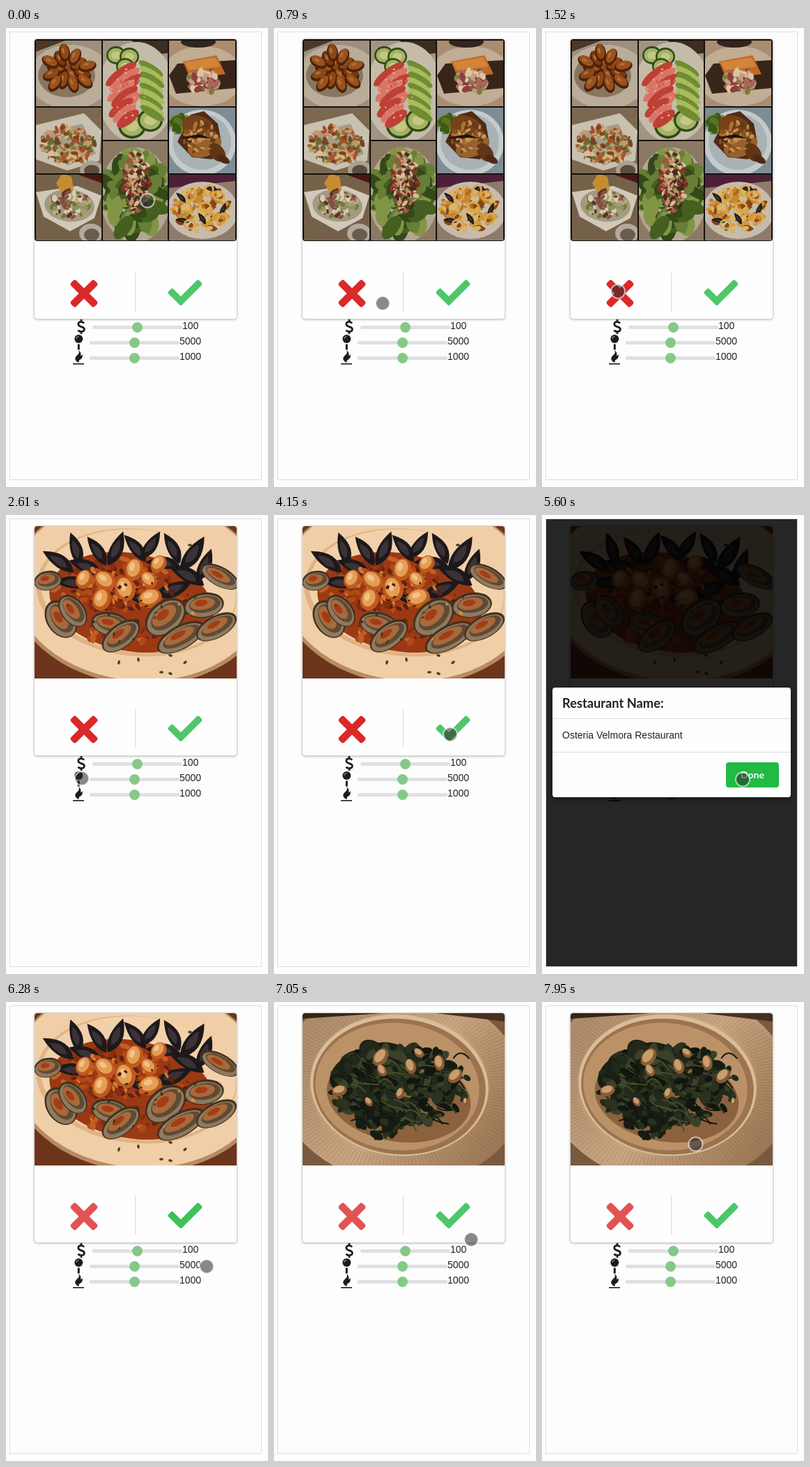
Animation, 376 px wide and 657 px high, one loop 8 s. Source, as an HTML page with a canvas:

```html
<!DOCTYPE html>
<html lang="en">
<head>
<meta charset="utf-8">
<title>Restaurant picker</title>
<style>
html, body { margin: 0; width: 100%; height: 100%; overflow: hidden; background: #fdfdfd; }
canvas { display: block; }
</style>
</head>
<body>
<canvas id="stage" width="376" height="657"></canvas>
<script>
const LOOP = 8000;
const stage = document.getElementById('stage').getContext('2d');
let g = stage, seed = 1;

const rnd = () => (seed = seed * 16807 % 2147483647) / 2147483647;
const pick = list => list[Math.floor(rnd() * list.length)];

function el(color, x, y, rx, ry = rx, angle = 0) {
  g.fillStyle = color;
  g.beginPath();
  g.ellipse(x, y, rx, ry, angle, 0, 7);
  g.fill();
}
function rect(color, x, y, w, h, r = 0) {
  g.fillStyle = color;
  g.beginPath();
  g.roundRect(x, y, w, h, r);
  g.fill();
}
function poly(color, ...p) {
  g.fillStyle = color;
  g.beginPath();
  for (let i = 0; i < p.length; i += 2) g.lineTo(p[i], p[i + 1]);
  g.fill();
}
function text(str, x, y, font, color = '#222', align = 'left') {
  g.font = font;
  g.fillStyle = color;
  g.textAlign = align;
  g.fillText(str, x, y);
}
// Random slivers spread over an ellipse
function scatter(n, x, y, rx, ry, size, colors) {
  while (n--) {
    const a = rnd() * 6.28, d = Math.sqrt(rnd()), s = size * (.5 + rnd() * .6);
    el(pick(colors), x + Math.cos(a) * d * rx, y + Math.sin(a) * d * ry, s, s * (.35 + rnd() * .4), rnd() * 3.1);
  }
}
function mussel(x, y, len, angle) {
  g.save();
  g.translate(x, y);
  g.rotate(angle);
  for (const [color, k] of [['#1d191b', 1], ['#3a3236', .55]]) {
    g.fillStyle = color;
    g.beginPath();
    g.moveTo(-len * k, 0);
    g.quadraticCurveTo(len * .2 * k, -len * .85 * k, len * k, 0);
    g.quadraticCurveTo(len * .2 * k, len * .55 * k, -len * k, 0);
    g.fill();
  }
  g.restore();
}
function clam(x, y, rx, ry, angle) {
  el('#43311f', x, y, rx, ry, angle);
  el('#8d7a5f', x, y + 1, rx * .92, ry * .87, angle);
  el('#5f4a34', x + 1, y - 1, rx * .78, ry * .66, angle);
  el('#a76a3c', x - 2, y - 2, rx * .62, ry * .48, angle);
  el('#a23d17', x - 4, y - 3, rx * .32, ry * .25, angle);
}

function photo(height, paint) {
  const canvas = document.createElement('canvas');
  canvas.width = 290;
  canvas.height = height;
  g = canvas.getContext('2d');
  g.translate(-41, -16);
  seed = 4711;
  paint();
  g = stage;
  return canvas;
}
function tile(x, y, w, h, color, paint) {
  g.save();
  g.beginPath();
  g.rect(x, y, w, h);
  g.clip();
  rect(color, x, y, w, h);
  paint();
  g.restore();
}

const collage = photo(289, () => {
  rect('#15110e', 41, 16, 290, 289);
  tile(43, 18, 94, 94, '#9d8f7c', () => {
    poly('#4d3929', 43, 18, 85, 18, 43, 34);
    el('#b9ac99', 92, 70, 60, 46);
    el('#897661', 87, 68, 41, 31);
    for (let i = 0; i < 17; i++) {
      const a = i * 2.4, d = Math.sqrt(i) * 8.2;
      const x = 88 + Math.cos(a) * d, y = 59 + Math.sin(a) * d * .78;
      el('#4c210b', x, y + 1, 13, 8, a);
      el(pick(['#793810', '#8c4717', '#9a511d']), x, y - 1, 11, 6, a);
      el('#b26d32', x - 2, y - 2, 4, 2, a);
    }
  });
  tile(43, 114, 94, 94, '#7c6751', () => {
    poly('#c9c1b0', 43, 139, 112, 122, 137, 147, 134, 190, 88, 204, 43, 188);
    poly('#a59b88', 53, 150, 110, 137, 129, 180, 88, 197);
    scatter(190, 89, 167, 39, 28, 5, ['#9f6a38', '#c49a68', '#75441f', '#d6b17b', '#617034', '#aa4b2a']);
    el('#a9a292', 123, 203, 17, 13);
    el('#5b4d3e', 123, 204, 11, 8);
  });
  tile(43, 210, 94, 94, '#756149', () => {
    poly('#4a1816', 104, 210, 137, 210, 137, 222);
    poly('#d0c9ba', 43, 235, 102, 226, 137, 240, 127, 272, 92, 291, 54, 270);
    el('#a49a7e', 91, 254, 36, 23, .1);
    poly('#c58c32', 72, 222, 81, 208, 94, 213, 97, 232, 80, 236);
    scatter(90, 92, 252, 28, 19, 5, ['#6e783c', '#c3aa87', '#8c4a45', '#d8ccb5', '#5b3429', '#8e9255']);
    el('#b3aa9b', 122, 294, 17, 14);
    el('#6b5c4d', 123, 296, 11, 9);
  });
  tile(139, 18, 93, 142, '#a29480', () => {
    poly('#3c2d22', 180, 18, 232, 18, 232, 36, 208, 39);
    el('#c4bba9', 187, 92, 56, 72);
    for (const [x, y, r] of [[158, 39, 14], [177, 41, 14], [171, 55, 13], [181, 140, 20], [207, 132, 18]]) {
      el('#304915', x, y, r, r * .92);
      el('#a4b267', x, y, r * .82, r * .73);
      el('#c3c882', x, y, r * .48, r * .4);
    }
    for (let i = 0; i < 9; i++) {
      el(i % 2 ? '#d97568' : '#be4035', 165 + i % 3 * 5, 66 + i * 8, 27 - i, 8, -.65);
      el(i % 2 ? '#aabb5d' : '#6f8c33', 208 + i % 3, 58 + i * 8, 20, 6, .55);
    }
    scatter(45, 174, 94, 25, 35, 2, ['#e69a86', '#c74e40', '#e8b199']);
  });
  tile(139, 162, 93, 142, '#8c7964', () => {
    el('#b4a68f', 186, 239, 51, 68);
    scatter(90, 186, 237, 42, 55, 18, ['#455f21', '#667e36', '#334919', '#829546']);
    scatter(170, 188, 221, 19, 43, 5, ['#8f3425', '#c48e6c', '#653525', '#d8b99a', '#9f5138', '#452b20']);
  });
  tile(234, 18, 95, 94, '#aa8d70', () => {
    el('#c1ad94', 282, 69, 59, 43);
    poly('#372519', 234, 68, 246, 51, 329, 46, 329, 86, 244, 94);
    poly('#bd6a27', 254, 48, 302, 39, 315, 66, 264, 72);
    poly('#d28538', 256, 49, 300, 42, 308, 55, 263, 61);
    scatter(70, 283, 77, 21, 17, 7, ['#c59c81', '#8d3e3c', '#dcc3a7', '#a76759', '#7d7942']);
    el('#33251d', 276, 20, 25, 8);
  });
  tile(234, 114, 95, 94, '#7e8c94', () => {
    el('#c4cacb', 281, 164, 49, 47);
    el('#a8b1b4', 281, 163, 42, 40);
    scatter(24, 250, 137, 12, 13, 9, ['#557522', '#78932d', '#3e5818']);
    poly('#502b14', 246, 163, 265, 124, 284, 119, 304, 137, 309, 164, 296, 188, 267, 185);
    el('#764119', 276, 142, 24, 16, .35);
    el('#98602d', 285, 169, 25, 15, -.35);
    el('#613515', 303, 178, 15, 10, .9);
    scatter(45, 280, 158, 25, 24, 5, ['#ad7339', '#67391a', '#875022', '#c59554']);
    poly('#1c130e', 247, 158, 277, 152, 296, 158, 276, 157);
    el('#4b2a17', 312, 188, 10, 5, .5);
  });
  tile(234, 210, 95, 94, '#8e7b6b', () => {
    poly('#4d2038', 234, 210, 329, 210, 329, 219, 234, 229);
    el('#c6bcae', 282, 261, 51, 41);
    scatter(150, 280, 258, 40, 31, 7, ['#b66a20', '#d29a3a', '#854514', '#c48732', '#d7b570']);
    for (const [x, y, a] of [[251, 243, .8], [253, 276, .2], [281, 273, 1], [311, 259, 2], [295, 231, .2]])
      mussel(x, y, 10, a);
    g.strokeStyle = '#dda548';
    g.lineWidth = 3;
    for (const [x, y] of [[266, 240], [291, 233], [305, 240], [286, 256], [264, 281], [310, 273]]) {
      g.beginPath();
      g.ellipse(x, y, 8, 6, x, 0, 7);
      g.stroke();
    }
  });
});

const seafood = photo(218, () => {
  rect('#6d351c', 41, 16, 290, 218);
  el('#b98a62', 191, 109, 184, 134, .08);
  el('#f0cfa8', 191, 107, 180, 130, .08);
  el('#dfb385', 187, 111, 144, 91, .1);
  el('#f2d1aa', 190, 109, 140, 88, .1);
  el('#9b3914', 180, 125, 119, 70, .18);
  scatter(90, 180, 123, 115, 62, 8, ['#ad4819', '#812d10', '#c35f25', '#682411']);
  for (const [x, y, l, a] of [[75, 67, 27, .6], [99, 49, 25, 1.3], [114, 75, 26, .4], [130, 52, 25, 1],
    [157, 48, 27, 2], [185, 48, 25, .9], [207, 43, 24, 2.2], [225, 70, 25, .1], [238, 48, 25, 1.1],
    [267, 55, 30, 2.2], [259, 87, 29, .5], [284, 72, 26, 2], [94, 98, 25, .1], [240, 105, 29, 2.8], [199, 121, 27, .2]])
    mussel(x, y, l, a);
  scatter(100, 168, 104, 75, 33, 6, ['#5e210f', '#b44b19', '#822e12', '#d87732']);
  for (const [x, y, r] of [[112, 92, 14], [142, 94, 16], [184, 78, 16], [171, 106, 18], [207, 119, 17],
    [137, 121, 16], [219, 70, 13], [205, 93, 13]]) {
    el('#bf5a1f', x, y, r, r * .82, x);
    el('#e59e55', x - 1, y - 2, r * .78, r * .58, x);
    el('#f1c28a', x - 3, y - 4, r * .38, r * .24, x);
  }
  for (const c of [[60, 94, 20, 14, -.2], [307, 88, 30, 14, .5], [79, 149, 29, 21, 1], [96, 137, 26, 17, .9],
    [150, 156, 28, 17, .2], [165, 173, 32, 17, -.65], [229, 146, 33, 23, -.7], [284, 129, 29, 18, -.15],
    [251, 175, 38, 17, -.5], [302, 160, 32, 16, -.5]]) clam(...c);
  scatter(30, 180, 136, 105, 48, 3, ['#343719', '#e08b42', '#571d0d']);
  for (const [x, y] of [[236, 201], [257, 211], [223, 225], [190, 207], [162, 211], [236, 227], [264, 43]])
    el('#49401c', x, y, 3, 1.8, x);
});

const spinach = photo(218, () => {
  const shade = g.createLinearGradient(41, 16, 331, 234);
  shade.addColorStop(0, '#aa8967');
  shade.addColorStop(.5, '#c8a681');
  shade.addColorStop(1, '#96704e');
  rect('#795a40', 41, 16, 290, 218);
  el(shade, 182, 120, 178, 140, .1);
  g.strokeStyle = 'rgba(95,65,40,.22)';
  g.lineWidth = 1;
  g.beginPath();
  for (let i = 0; i < 170; i++) {
    const a = i / 170 * Math.PI * 2, c = Math.cos(a), s = Math.sin(a);
    g.moveTo(180 + c * 130, 119 + s * 103);
    g.lineTo(181 + c * 169, 120 + s * 135);
  }
  g.stroke();
  el('#dabc96', 180, 119, 128, 101, .1);
  el('#9b7350', 180, 121, 124, 97, .1);
  el('#bb9168', 177, 121, 118, 91, .1);
  el('#8b623d', 179, 136, 104, 64, .15);
  poly('#372419', 41, 16, 156, 16, 41, 24);
  poly('#4a3021', 232, 16, 331, 16, 331, 28);
  scatter(55, 177, 116, 80, 47, 26, ['#242819', '#1b2015', '#2c3220']);
  scatter(260, 179, 120, 100, 58, 10, ['#171c13', '#2b3320', '#20291a', '#39412a', '#11160f']);
  scatter(40, 158, 167, 40, 27, 10, ['#171d13', '#292f1e']);
  g.lineWidth = 2;
  for (let i = 0; i < 55; i++) {
    const x = 98 + rnd() * 160, y = 77 + rnd() * 94;
    g.strokeStyle = pick(['#444c2e', '#30391f', '#12170f']);
    g.beginPath();
    g.moveTo(x, y);
    g.quadraticCurveTo(x + 10, y - 18 + rnd() * 30, x + 23, y + rnd() * 15);
    g.stroke();
  }
  for (const [x, y, r] of [[153, 79, 14], [94, 127, 11], [237, 87, 11], [196, 92, 11], [260, 106, 12],
    [155, 98, 9], [181, 131, 8], [136, 143, 7], [208, 73, 8], [275, 143, 5]]) {
    el('#875c35', x, y, r, r * .7, x);
    el('#c99d6d', x - 1, y - 2, r * .75, r * .45, x);
  }
});

const check = new Path2D('M174 439L7.5 273c-10-10-10-26 0-36l36-36c10-10 26-10 36 0L192 313 432 73c10-10 26-10 36 0l36 36c10 10 10 26 0 36L210 439c-10 10-26 10-36 0z');
const dollar = new Path2D('M112 422.7Q110.5 420.7 108 420.7Q103.8 420.7 103.8 424Q103.8 426.5 108 427.6Q112.4 428.7 112.4 431.3Q112.4 434.6 108 434.6Q105 434.6 103.4 432.6M108 417V421M108 434V438');
const flame = new Path2D('M104 461Q106.5 465 102 468.5Q97 473 101 477Q102.5 478.5 105 479Q103.5 476.5 106 475Q111 472 109.5 467Q108.5 469 107 469Q108.5 464 104 461Z');

function choices(dy, crossAlpha, checkAlpha) {
  g.save();
  g.translate(0, dy);
  rect('#d9d9d9', 185, 350, 1, 56);
  g.save();
  g.globalAlpha = crossAlpha;
  g.translate(112, 380);
  g.fillStyle = '#db2828';
  g.beginPath();
  g.rotate(Math.PI / 4);
  g.roundRect(-24, -5.25, 48, 10.5, 3.4);
  g.roundRect(-5.25, -24, 10.5, 48, 3.4);
  g.fill();
  g.restore();
  g.globalAlpha = checkAlpha;
  g.translate(232.5, 354.3);
  g.scale(.0957, .0957);
  g.fillStyle = '#21ba45';
  g.fill(check);
  g.restore();
}

function sliders(dy) {
  g.save();
  g.translate(0, dy);
  [['100', 124], ['5000', 120], ['1000', 120]].forEach(([label, x], i) => {
    const y = 428.5 + i * 22;
    rect('#e0e0e0', x, y - 2.5, 129, 5, 2);
    el('#85c987', x + 64.5, y, 7.5);
    text(label, x + 129, y + 2.5, '14px "Liberation Sans", Arial, sans-serif');
  });
  g.strokeStyle = g.fillStyle = '#1b1c1d';
  g.lineWidth = 2.7;
  g.stroke(dollar);
  g.fill(flame);
  rect('#1b1c1d', 96, 480, 16, 1.6);
  el('#1b1c1d', 104.3, 445, 6);
  rect('#1b1c1d', 102.8, 452.5, 3, 8);
  g.strokeStyle = '#bbb';
  g.lineWidth = 1;
  g.beginPath();
  g.arc(104.3, 445, 3.5, 3.2, 4.7);
  g.stroke();
  g.restore();
}

function modal() {
  rect('rgba(0,0,0,.85)', 6, 6, 360, 640);
  g.save();
  g.shadowColor = 'rgba(0,0,0,.5)';
  g.shadowBlur = 6;
  g.shadowOffsetY = 2;
  rect('#fdfefe', 15, 247, 342, 157, 4);
  g.restore();
  rect('#dcdddd', 15, 291, 342, 1);
  rect('#dcdddd', 15, 339, 342, 1);
  text('Restaurant Name:', 29, 275.5, 'bold 18.3px Lato, sans-serif');
  text('Osteria Velmora Restaurant', 29, 320, '14px "Liberation Sans", Arial, sans-serif');
  rect('#21ba45', 264, 354, 76, 36, 4);
  text('Done', 302, 377, 'bold 14px Lato, sans-serif', '#fff', 'center');
}

// Pointer stops: time, x, y
const stops = [
  [0, 203, 247], [120, 200, 240], [250, 199, 234], [400, 187, 270], [530, 171, 310], [670, 164, 355],
  [790, 156, 394], [940, 135, 391], [1060, 123, 388], [1220, 120, 387], [1370, 113, 384], [1520, 109, 377],
  [3730, 153, 340], [3880, 190, 330], [4010, 225, 321], [4150, 253, 314], [5210, 254, 322], [5360, 257, 333],
  [5480, 272, 356], [5600, 288, 378.5], [7050, 283, 340], [7170, 272, 290], [7290, 261, 248],
  [7430, 257, 233], [7560, 250, 219], [7680, 244, 208], [7950, 220.5, 203.5]
];
function pointer(t) {
  const [, x, y] = stops.findLast(s => s[0] <= t);
  el('rgba(40,40,40,.55)', x, y, 10);
  g.strokeStyle = 'rgba(255,255,255,.6)';
  g.lineWidth = 2;
  g.beginPath();
  g.arc(x, y, 10, 0, 7);
  g.stroke();
}

function draw(t) {
  const first = t < 2610, closed = t >= 6280;
  const image = first ? collage : t < 6400 ? seafood : spinach;
  rect('#fdfdfd', 0, 0, 376, 657);
  g.strokeStyle = '#dedede';
  g.lineWidth = 1;
  g.strokeRect(5.5, 5.5, 361, 641);

  const height = first ? 400 : 328;
  g.save();
  g.shadowColor = '#c4c4c5';
  g.shadowBlur = 3;
  g.shadowOffsetY = 1;
  rect('#d4d4d5', 40, 15, 292, height + 2, 5);
  g.restore();
  rect('#fefefe', 41, 16, 290, height, 4);
  g.save();
  g.beginPath();
  g.roundRect(41, 16, 290, image.height, first ? 4 : [4, 4, 0, 0]);
  g.clip();
  g.drawImage(image, 41, 16);
  g.restore();

  choices(first ? 0 : -73, closed ? .8 : 1, closed && t < 6400 ? .88 : .8);
  sliders(first ? 0 : -72);
  if (t >= 4710 && !closed) modal();
  pointer(t);
}

function tick() {
  draw(performance.now() % LOOP);
  requestAnimationFrame(tick);
}
tick();
</script>
</body>
</html>
```
